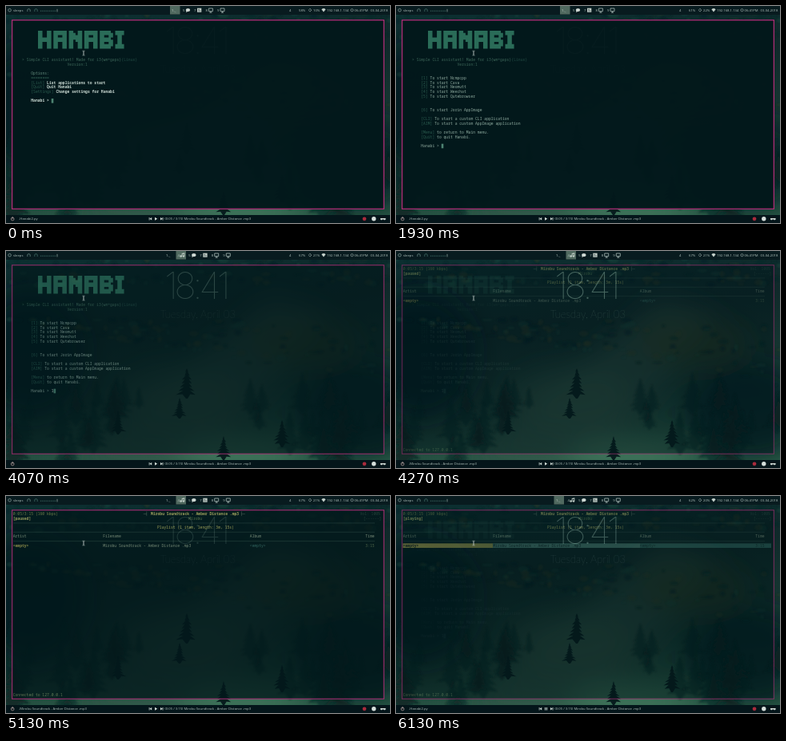
An HTML page for the animation above (6190 ms loop, 480x272 px).

```html
<!DOCTYPE html>
<html lang="en">
<head>
<meta charset="utf-8">
<title>Terminal launcher</title>
<style>
html, body { margin: 0; height: 100%; overflow: hidden; background: #07191c }
svg { display: block; width: 100vw; height: 100vh }
text { white-space: pre; font: 4.2px "Noto Sans", "Open Sans", sans-serif }
.m { font: 4.71px "Noto Sans Mono", "DejaVu Sans Mono", monospace }
.b { font-weight: 700 }
.clock { font: 100 46px Inter, Lato, sans-serif; letter-spacing: -4.5px }
.date { font: 100 13px Lato, Inter, sans-serif }
</style>
</head>
<body>
<svg viewBox="0 0 480 272">
  <defs>
    <linearGradient id="sky" x1="0" y1="0" x2=".25" y2="1">
      <stop offset="0" stop-color="#0b3032"/>
      <stop offset=".4" stop-color="#10292a"/>
      <stop offset=".75" stop-color="#183a34"/>
      <stop offset="1" stop-color="#2b5b48"/>
    </linearGradient>
    <linearGradient id="gold">
      <stop offset="0" stop-color="#b5a94d"/>
      <stop offset="1" stop-color="#8e8c42"/>
    </linearGradient>
    <filter id="soft" x="-50%" y="-50%" width="200%" height="200%"><feGaussianBlur stdDeviation="16"/></filter>
    <filter id="haze"><feGaussianBlur stdDeviation="1.1"/></filter>
  </defs>
  <rect width="480" height="272" fill="url(#sky)"/>
  <g filter="url(#soft)">
    <path d="M330 60L400 80 250 270 80 270z" fill="#37594a" opacity=".5"/>
    <ellipse cx="215" cy="185" rx="75" ry="38" fill="#33564a" opacity=".55"/>
    <ellipse cx="290" cy="258" rx="75" ry="22" fill="#4c8466" opacity=".6"/>
    <ellipse cx="30" cy="130" rx="70" ry="80" fill="#071b20" opacity=".8"/>
    <ellipse cx="440" cy="200" rx="80" ry="60" fill="#081e1f" opacity=".75"/>
    <ellipse cx="370" cy="115" rx="70" ry="30" fill="#2f3b20" opacity=".55"/>
  </g>
  <g id="forest" filter="url(#haze)"></g>
  <g id="trees" fill="#071d1e"></g>
  <g id="widget" fill="#83aa9c" text-anchor="middle">
    <text class="clock" x="237" y="60">18:41</text>
    <text class="date" x="240" y="84">Tuesday, April 03</text>
  </g>
  <g id="hanabi"></g>
  <g id="player"></g>
  <path d="M95.5 56.3h1q.5 0 .5.6v4.4q0 .6-.5.6h-1M98.5 56.3h-1q-.5 0-.5.6v4.4q0 .6.5.6h1" fill="none" stroke="#b5c2bc" stroke-width=".6"/>
  <g id="bars"></g>
</svg>
<script>
const LOOP = 6190, CHAR = 2.826;
const $ = id => document.getElementById(id);
const song = 'Mirobu Soundtrack - Amber Distance .mp3';

let seed = 11;
const rnd = () => (seed = seed * 16807 % 2147483647) / 2147483647;
const colX = c => 8.7 + CHAR * c, rowY = r => 24.1 + 5.667 * r;
const rect = (x, y, w, h, fill, more = '') =>
  `<rect x="${x}" y="${y}" width="${w}" height="${h}" fill="${fill}" ${more}/>`;
const path = (d, fill, more = '') => `<path d="${d}" fill="${fill}" ${more}/>`;
const line = (d, color, w = .6) => path(d, 'none', `stroke="${color}" stroke-width="${w}"`);
const esc = s => s.replace(/</g, '&lt;');
const label = (x, y, s, fill = '#a9bab5', id = '') =>
  `<text x="${x}" y="${y}" fill="${fill}" ${id && `id="${id}"`}>${esc(s)}</text>`;
const mono = (col, row, s, fill, bold = '', id = '') =>
  `<text class="m ${bold}" x="${colX(col)}" y="${rowY(row)}" fill="${fill}" ${id && `id="${id}"`}>${esc(s)}</text>`;
const frame = rect(7.6, 17.7, 464.8, 236.6, '#03181b', 'fill-opacity=".97" stroke="#b42d79" stroke-width="1.2"');

// Wallpaper
function spruce(x, y, h) {
  let left = '', right = '';
  for (let i = 1; i <= 7; i++) {
    const w = h * .33 * i / 7, a = w * (.7 + .5 * rnd()), b = w * (.7 + .5 * rnd()), yy = y + h * i / 8;
    left += `L${x - a} ${yy}L${x - a * .4} ${yy - h * .02}`;
    right = `L${x + b * .4} ${yy - h * .02}L${x + b} ${yy}` + right;
  }
  return path(`M${x} ${y}${left}L${x - 1} ${y + h}h2${right}z`, 'inherit');
}
let art = '';
for (let i = 0; i < 260; i++) {
  const x = rnd() * 480, top = rnd() < .45;
  const y = top ? 8 + rnd() * 35 : 85 + (x / 480) * rnd() * 90;
  const tint = ['#071f22', '#374225', '#1c4a42', '#0a2829'][rnd() * 4 | 0];
  art += `<ellipse cx="${x}" cy="${y}" rx="${2 + rnd() * 5}" ry="${1 + rnd() * 3}" fill="${tint}" opacity=".4"/>`;
}
for (let i = 0; i < 46; i++) {
  const x = i % 2 ? rnd() * 175 : 300 + rnd() * 180, h = 25 + rnd() * 45;
  art += `<g fill="#0a2323" opacity=".5">${spruce(x, 150 + rnd() * 80, h)}</g>`;
}
$('forest').innerHTML = art;
$('trees').innerHTML = spruce(226, 147, 38) + spruce(217, 184, 26) + spruce(272, 232, 30)
  + spruce(140, 200, 30) + spruce(345, 212, 34);

// Launcher window
const glyphs = {
  H: 'M0 0h2v3h2v-3h2v8h-2v-3h-2v3h-2z',
  A: 'M0 0h6v8h-2v-3h-2v3h-2zM2 2h2v1h-2z',
  N: 'M0 0h2v1h1v1h1v-2h2v8h-2v-3h-1v-1h-1v4h-2z',
  B: 'M0 0h5v1h1v2h-1v1h1v3h-1v1h-5zM2 2h2v1h-2zM2 5h2v1h-2z',
  I: 'M0 0h4v2h-1v4h1v2h-4v-2h1v-4h-1z'
};
const logo = [...'HANABI'].map((c, i) =>
  path(glyphs[c], '#2a6c58', `fill-rule="evenodd" transform="translate(${40 + i * 19.3} 31) scale(2.77 2.8)"`)).join('');

const dim = '#2b5d50', soft = '#91ada1', white = '#ccdbd4';
const entry = (row, key, s, fill, bold) =>
  mono(8, row, `[${key}]`, dim) + mono(11 + key.length, row, s, fill, bold);
const mainMenu = mono(8, 11, 'Options:', '#638b7d') + mono(8, 12, '========', '#3e7060')
  + entry(13, 'List', 'List applications to start', white, 'b')
  + entry(14, 'Quit', 'Quit Hanabi', white, 'b')
  + entry(15, 'Settings', 'Change settings for Hanabi', white, 'b')
  + mono(8, 17, 'Hanabi >', white, 'b');
const appMenu = ['Ncmpcpp', 'Cava', 'Neomutt', 'Weechat', 'Qutebrowser']
  .map((s, i) => entry(12 + i, `${i + 1}`, 'To start ' + s, soft)).join('')
  + entry(19, '6', 'To start Jorin AppImage', soft)
  + entry(21, 'CLI', 'To start a custom CLI application', soft)
  + entry(22, 'AIM', 'To start a custom AppImage application', soft)
  + entry(24, 'Menu', 'to return to Main menu.', soft)
  + entry(25, 'Quit', 'to quit Hanabi.', soft)
  + mono(8, 27, 'Hanabi >', soft);
$('hanabi').innerHTML = frame + logo
  + mono(4, 8, '> Simple CLI assistant! Made for i3{wm+gaps}', '#3c6658')
  + mono(48, 8, '{Linux}', '#234c44') + mono(24, 9, 'Version:1', '#3c6658')
  + `<g id="mainMenu">${mainMenu}</g><g id="appMenu">${appMenu}</g>`
  + mono(17, 17, '', white, '', 'typed') + rect(0, 0, 2.6, 5.6, '#4d8372', 'id="caret"');

// Music player window
const gold = '#aaa552', grey = '#8fa188', teal = '#3a746b', rule = '#34524a';
const rules = [2, 4, 6].map(r => line(`M9 ${rowY(r) - 1.5}H461`, rule, .5)).join('');
const rowText = (a, b, c, d) => mono(0, 7, '<empty>', a, 'b') + mono(39.8, 7, song, b)
  + mono(104.8, 7, '<empty>', c) + mono(155.9, 7, '3:15', d);
$('player').innerHTML = frame + rules
  + mono(0, 0, '0:05/3:15 (160 kbps)', '#85904e') + mono(57.7, 0, '─┤ ' + ' '.repeat(39) + ' ├─', grey)
  + mono(61, 0, song, '#c5c06b', 'b') + mono(153.5, 0, 'Vol: 100%', '#2a473e')
  + mono(0, 1, '', '#bcb969', 'b', 'state') + mono(77.7, 1, 'Mirobu', '#66804f')
  + mono(155, 1, '[------]', '#2a473e')
  + mono(63.8, 3, 'Playlist (1 item, length: 3m, 15s)', '#c0bb62')
  + mono(0, 5, 'Artist', grey) + mono(39.8, 5, 'Filename', grey)
  + mono(104.8, 5, 'Album', grey) + mono(155.9, 5, 'Time', grey)
  + `<g id="plain">${rowText(gold, grey, teal, '#5f7550')}</g>`
  + `<g id="picked">${rect(8.5, 59.4, 112.5, 5.6, 'url(#gold)') + rect(121, 59.4, 184, 5.6, '#44746a')
    + rect(305, 59.4, 164, 5.6, '#285c56') + rowText('#14231c', '#081d1d', '#0b2625', '#0b2625')}</g>`
  + mono(0, 40, 'Connected to 127.0.0.1', '#71875d');

// Panels
const ink = '#a9bab5';
const screenIcon = x => line(`M${x} 3h5v3.6h-5zM${x + 1} 8.2h3M${x + 2.5} 6.6v1.6`, ink, .8);
const workspaces = rect(0, 0, 12.5, 10.5, '#50695f', 'id="active"')
  + `<g id="one">${label(207, 6.8, '1._', '#c3d0c9')}</g>`
  + `<g id="four">${label(214.5, 6.8, '4')}${path('M219 7.5a1.2 1.2 0 1 1 .7-1.1V3l3.6-.7v4a1.2 1.2 0 1 1-.8-1V3.7l-2 .4v3z', '#c3d0c9')}</g>`
  + `<g id="rest">${label(221, 6.8, '5')}<ellipse cx="227.5" cy="5" rx="2.7" ry="2.1" fill="#d0dad5"/>${path('M225.5 6l-.5 2 2-1z', '#d0dad5')}`
  + label(235, 6.8, '7') + rect(239, 2.7, 5.3, 5, '#c2cdc7') + line('M240 4.4h2M240 6h3.4', '#23383a')
  + label(249.5, 6.8, '8') + screenIcon(253.4) + label(264, 6.8, '9') + screenIcon(268) + '</g>';
const stats = line('M346.5 5.2l2.6-2.4 2.6 2.4M347.4 5v2.6h3.4V5') + label(354, 6.8, '4')
  + line('M359 5.5h1.2l.9-2 1.2 3.8.8-1.8h1') + label(366, 6.8, '', ink, 'cpu')
  + '<circle cx="380" cy="5.2" r="1.5" fill="none" stroke="#a9bab5" stroke-dasharray=".8 .5"/>'
  + label(384, 6.8, '', ink, 'ram')
  + path('M394.4 4.2q2.6-2.3 5.2 0L397 7.6z', '#c6d2cc') + label(401, 6.8, '192.168.1.134')
  + '<circle cx="432.5" cy="5.2" r="1.6" fill="none" stroke="#a9bab5" stroke-width=".6"/>' + line('M432.5 4v1.3h.9')
  + label(435.5, 6.8, '06:41PM') + label(455.5, 6.8, '03-04-2018');
const corner = '<circle cx="4.6" cy="5.2" r="1.8" fill="none" stroke="#8fa7a2" stroke-width=".7"/>'
  + label(9, 6.8, 'sleeps') + line('M26.8 7V5.3a1.7 1.7 0 0 1 3.4 0V7', '#698883', .8)
  + line('M35.8 7V5.3a1.7 1.7 0 0 1 3.4 0V7', '#426c66', .8)
  + path('M43 6.2h20', 'none', 'stroke="#4d8175" stroke-width=".8" stroke-dasharray="1.2 1"')
  + line('M64 3.8v3.6', '#99b0a8', .7);
const controls = '<circle cx="8.2" cy="267" r="1.9" fill="none" stroke="#b9a19f" stroke-width=".7"/>'
  + line('M8.2 264.2v2.6', '#d9c2bf', .7) + label(16, 268.4, '', ink, 'title')
  + path('M178.7 265h.8v3.6h-.8zM182.2 265v3.6l-2.6-1.8zM193 265l2.6 1.8-2.6 1.8zM195.6 265h.8v3.6h-.8z', '#d2ddd8')
  + path('', '#d2ddd8', 'id="toggle"') + label(198.5, 268.4, '(0:05 / 3:15) ' + song)
  + '<circle cx="448" cy="266.8" r="2.4" fill="#a92b3c"/><circle cx="459.8" cy="266.8" r="2.7" fill="#d6dfdb"/>'
  + path('M468 266h6.6v1.3a1.3 1.3 0 0 1-2.5.2h-1.6a1.3 1.3 0 0 1-2.5-.2z', '#cbd6d1');
$('bars').innerHTML = rect(0, 0, 480, 11, '#081b1f') + rect(0, 262, 480, 10, '#04151a')
  + corner + workspaces + stats + controls;

// Motion
function tween(t, keys) {
  const i = keys.findIndex(k => k[0] > t);
  if (i < 0) return keys[keys.length - 1][1];
  if (!i) return keys[0][1];
  const [a, u] = keys[i - 1], [b, v] = keys[i];
  return u + (v - u) * (t - a) / (b - a);
}
const show = (id, on) => $(id).setAttribute('visibility', on ? 'visible' : 'hidden');
const move = (id, x, y = 0) => $(id).setAttribute('transform', `translate(${x} ${y})`);
const fade = (id, a) => $(id).setAttribute('opacity', a);

function draw(now) {
  const t = now % LOOP;
  const listed = t >= 1870, opened = t >= 3800, away = opened && t < 6070, playing = t >= 5470;

  const typed = listed ? (t >= 3530 ? '1' : '') : 'List'.slice(0, Math.max(0, Math.floor((t - 870) / 200)));
  const row = listed ? 27 : 17;
  show('mainMenu', !listed);
  show('appMenu', listed);
  $('typed').textContent = typed;
  $('typed').setAttribute('y', rowY(row));
  move('caret', colX(17 + typed.length), rowY(row) - 4.4);

  fade('hanabi', tween(t, [[3870, 1], [4070, .7], [4270, .17], [4400, 0], [6070, 0], [6130, .1], [6190, .2]]));
  fade('player', tween(t, [[4130, 0], [4270, .38], [4700, .65], [5130, .8], [5670, .9], [6050, .9], [6130, .5], [6190, .25]]));
  $('state').textContent = playing ? '[playing]' : '[paused]';
  show('picked', t >= 5270);
  show('plain', t < 5270);

  show('four', opened);
  move('one', opened ? -7 : 0);
  move('rest', opened ? 7.3 : 0);
  move('active', !opened ? 205 : away ? 212.5 : 197.5);
  $('cpu').textContent = t < 1870 ? '58%' : t < 3800 ? '61%' : t < 5730 ? '67%' : '62%';
  $('ram').textContent = t < 1870 ? '10%' : t < 3800 ? '22%' : t < 5730 ? '21%' : '20%';
  $('title').textContent = !away ? '-Hanabi2.py' : t < 4200 ? '' : '-' + song;
  $('toggle').setAttribute('d', playing ? 'M186 265h1v3.6h-1zM188 265h1v3.6h-1z' : 'M186 264.8l3.2 2-3.2 2z');
}
const start = performance.now();
function tick() {
  draw(performance.now() - start);
  requestAnimationFrame(tick);
}
tick();
</script>
</body>
</html>
```
